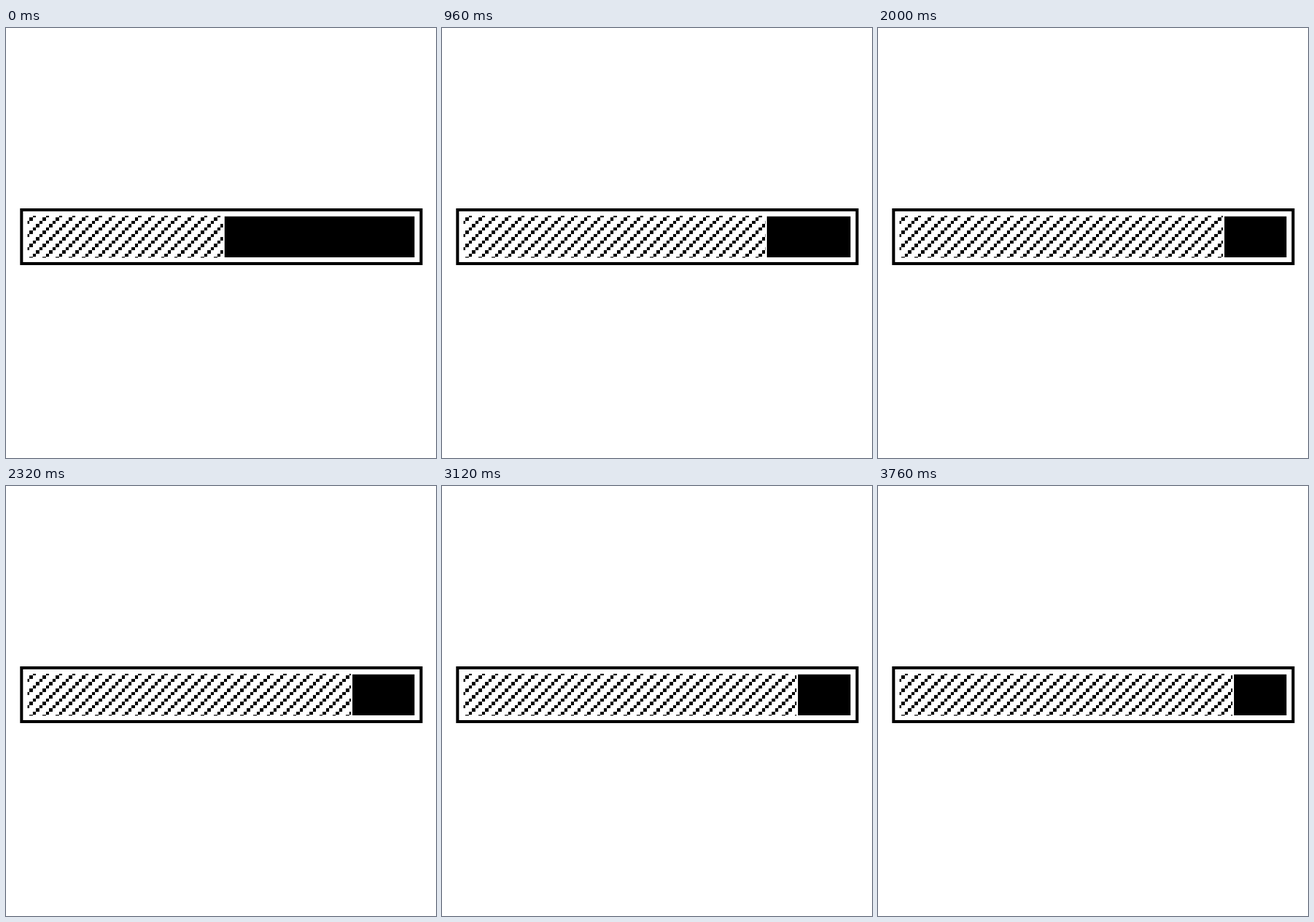
These frames come from a looping animation (720x720 px, 3.84 s). An HTML page with a canvas:

```html
<!DOCTYPE html>
<html lang="en">
<head>
<meta charset="utf-8">
<title>Progress bar</title>
<style>
  html, body { margin: 0; width: 100%; height: 100%; overflow: hidden; background: #fff; }
  canvas { display: block; }
</style>
</head>
<body>
<canvas id="stage" width="720" height="720"></canvas>
<script>
const ctx = document.getElementById('stage').getContext('2d');
const LOOP = 3840;
const TICK = 40;
const STRIPE_STEP = 80;
const CELL = 5.52;
const PERIOD = CELL * 4;
const LEFT = 36, RIGHT = 684;
const TOP = 314.5, BOTTOM = 384.5;

// Fill edge over time: [ms, x], linear in between
const path = [[0, 366], [720, 544], [1160, 544], [1820, 580], [2360, 580], [2520, 596], [LOOP, 596]];

function edgeAt(t) {
  const i = path.findIndex(([ms]) => ms > t);
  const [t0, x0] = path[i - 1];
  const [t1, x1] = path[i];
  return Math.round(x0 + (x1 - x0) * (t - t0) / (t1 - t0));
}

// The stripes flip by half a period each step, with one step held at mid-loop
function shiftAt(t) {
  const step = Math.floor(t / STRIPE_STEP) + (t >= LOOP / 2 ? 1 : 0);
  return step % 2 * PERIOD / 2;
}

function box(x0, y0, x1, y1, color) {
  ctx.fillStyle = color;
  ctx.fillRect(x0, y0, x1 - x0, y1 - y0);
}

function drawStripes(end, shift) {
  ctx.save();
  ctx.beginPath();
  ctx.rect(LEFT, TOP, end - LEFT, BOTTOM - TOP);
  ctx.clip();
  for (let row = 0; row < 14; row++) {
    const y = 317 + (row - 1) * CELL;
    const start = 44.6 + shift - row * CELL - PERIOD;
    for (let x = start; x < end; x += PERIOD) {
      box(Math.round(x), Math.round(y), Math.round(x + CELL), Math.round(y + CELL), '#000');
    }
  }
  ctx.restore();
}

function draw(ms) {
  const t = Math.floor(ms % LOOP / TICK) * TICK;
  const edge = edgeAt(t);
  box(0, 0, 720, 720, '#fff');
  box(23.5, 302, 697.5, 397, '#000');
  box(28.5, 307, 692.5, 392, '#fff');
  drawStripes(edge - 2.5, shiftAt(t));
  box(edge, 315.5, RIGHT, 384, '#000');
}

const begin = performance.now();
function frame() {
  draw(performance.now() - begin);
  requestAnimationFrame(frame);
}
frame();
</script>
</body>
</html>
```
